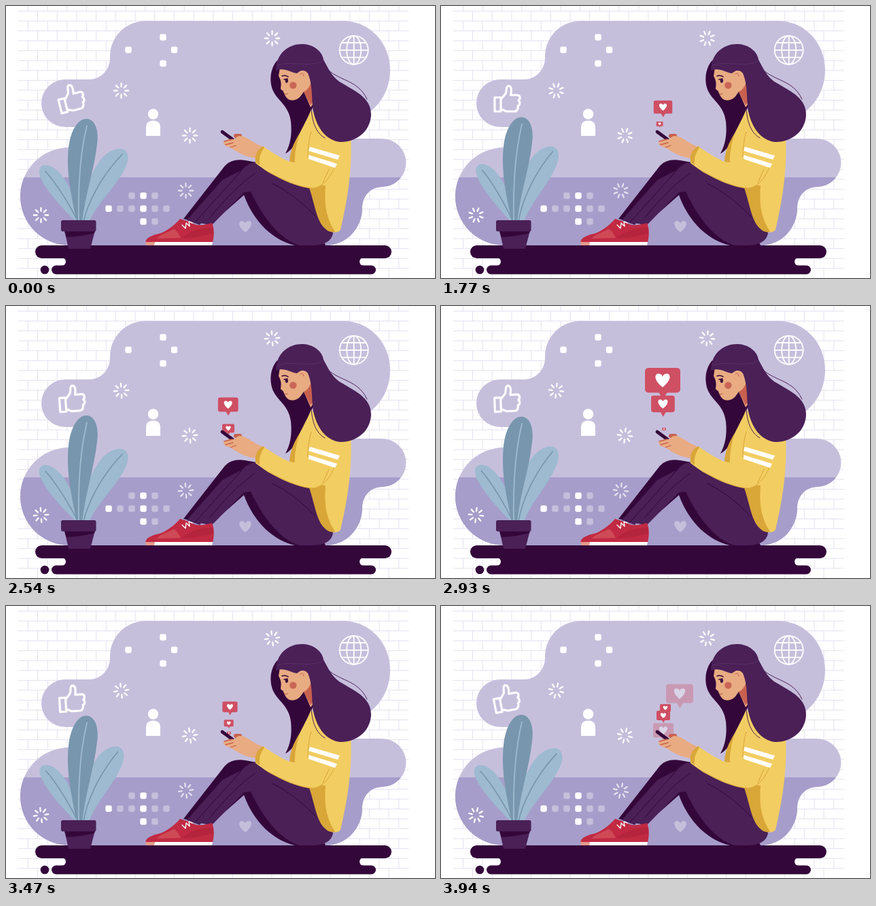
Recreate the animation shown at these times as an HTML page. Size 631x400 px, loop 4.03 s.

```html
<!DOCTYPE html>
<html lang="en">
<head>
<meta charset="utf-8">
<title>Likes</title>
<style>
  html, body { margin: 0; width: 100%; height: 100%; overflow: hidden; background: #fff; }
  svg { display: block; width: 631px; height: 400px; }
  .line { fill: none; stroke-linecap: round; stroke-linejoin: round; }
  .light { fill: #c6bfdc; }
  .plum { fill: #4a2057; }
  .dark { fill: #34073a; }
  .skin { fill: #e8ab82; }
  .sun { fill: #f2cd62; }
  .ochre { fill: #d9a638; }
  .white { fill: #fff; }
</style>
</head>
<body>
<svg viewBox="0 0 631 400">
  <defs>
    <path id="blob" d="M205 22H497A68 72 0 0 1 565 94C565 120 553 142 536 155C520 168 505 178 505 186Q505 195 514 195H553A35 35 0 0 1 553 266C536 266 524 280 524 297A54 55 0 0 1 470 352H93A72 72 0 0 1 93 208H104A15 15 0 0 0 104 178H87A35 35 0 0 1 87 108H122A31 31 0 0 0 153 77V74A52 52 0 0 1 205 22Z"/>
    <clipPath id="inside"><use href="#blob"/></clipPath>
    <path id="heart" d="M0 10C-14 -1 -12 -10 -6 -10C-2 -10 0 -7 0 -5C0 -7 2 -10 6 -10C12 -10 14 -1 0 10Z"/>
    <path id="ray" class="line" stroke="#fff" stroke-width="2.3" d="M0 -6V-10.7"/>
    <g id="rays"></g>
    <g id="bubble" fill="#cf4f63">
      <rect x="-26" y="-18.5" width="52" height="36.5" rx="5"/>
      <path d="M-6 17H7L.5 28Z"/>
      <use href="#heart" class="white"/>
    </g>
  </defs>

  <path id="bricks" class="line" stroke="#e4e0ef"/>
  <use href="#blob" class="light"/>
  <rect y="252" width="631" height="100" fill="#a69dca" clip-path="url(#inside)"/>
  <g id="dots"></g>
  <g id="bursts"></g>

  <g class="white">
    <circle cx="216.5" cy="159" r="7.7"/>
    <path d="M206 191V179Q206 168.5 216.5 168.5T227 179V191Z"/>
  </g>
  <use href="#heart" class="light" transform="translate(352 324.5) scale(.83)"/>

  <g class="line" stroke="#fff" stroke-width="1.8">
    <circle cx="511.7" cy="64.8" r="21"/>
    <ellipse cx="511.7" cy="64.8" rx="10.5" ry="21"/>
    <path d="M511.7 44V86M491 64.8H532M494 54H529M494 75.6H529"/>
  </g>

  <path id="thumb" class="line" stroke="#fff" stroke-width="3.2" d="M79 134.5H88V155H79ZM89 136L95 129C97 126 95 118 99 117.5C104 117.5 104 124 102.5 131H112C117 131 117 137 114 139C117 141 116 146 113 147C114 150 112 155 108 155H97C94 155 91 152 89 152"/>

  <g class="dark">
    <rect x="43" y="352" width="524" height="19" rx="9.5"/>
    <rect x="67" y="381.5" width="477" height="13" rx="6.5"/>
    <path d="M82 370H526A5 5 0 0 0 526 382H82A5 5 0 0 0 82 370Z"/>
    <circle cx="57" cy="388" r="6.3"/>
  </g>

  <g id="leafL">
    <path fill="#9dbad0" d="M103 317C75 290 45 255 49 240C52 232 62 233 70 238C92 252 104 290 112 317Z"/>
    <path class="line" stroke="#7896ae" stroke-width="1.7" d="M106 317C92 290 75 262 58 243"/>
  </g>
  <g id="leafR">
    <path fill="#9dbad0" d="M109 317C112 285 120 250 140 225C152 211 166 208 173 211C181 215 181 226 176 237C163 265 138 285 122 317Z"/>
    <path class="line" stroke="#7896ae" stroke-width="1.7" d="M114 317C120 290 140 250 171 218"/>
  </g>
  <g id="leafC">
    <path fill="#7896ae" d="M104 317C96 280 88 245 92 208C95 183 106 165 119 166C131 167 137 182 134 203C130 240 118 270 112 317Z"/>
    <path class="line" stroke="#a0bbd0" stroke-width="1.8" d="M107 317C106 270 108 220 119 176"/>
  </g>
  <path class="plum" d="M86 330H131L124 357H92Z"/>
  <path class="dark" d="M86 331H131L130 334Q111 339 88.5 340Z"/>
  <rect class="plum" x="81" y="315" width="51.5" height="16.5" rx="2.5"/>

  <g id="likes"></g>

  <!-- legs -->
  <path class="dark" d="M261 313L322 235Q332 224 352 227L380 232L440 290L470 352H425C395 345 365 320 350 278L300 322Z"/>
  <path class="plum" d="M266 315L318 256L345 242L285 322Z"/>
  <path class="plum" d="M278 318L345 244Q356 228 376 229L448 268C458 300 480 322 481 334C479 346 468 352 450 352H432C405 345 378 312 360 273L350 274L303 322Z"/>
  <path class="line" stroke="#34073a" d="M278 318L342 247M366 246C350 258 332 272 300 311M392 261Q425 277 455 309"/>

  <!-- shoe -->
  <path fill="#c12a42" d="M205 348C206 340 215 337 228 334C240 329 250 320 256 313L272 318C280 325 292 322 303 319C307 328 306 338 304 348Z"/>
  <path fill="#cf4a57" d="M222 342C227 335 240 333 246 328C252 330 254 336 257 341Z"/>
  <path fill="#a81f38" d="M258 341C270 333 280 326 304 326L305 335C290 337 280 342 258 341Z" opacity=".5"/>
  <path fill="#e39a8c" d="M205 347H220L219 352H206Z"/>
  <path class="white" d="M219 347H304L303 352H218Z"/>
  <path class="line" stroke="#fff" stroke-width="1.4" d="M259 322L264 327L265 319L270 324L269 317L274 319"/>

  <!-- back hair -->
  <path class="dark" d="M399 80C388 92 387 112 393 125C400 140 416 146 419 170C421 190 418 204 411 217C424 211 434 190 444 165L453 145L435 95Z"/>

  <!-- torso -->
  <path class="sun" d="M449 152C440 175 422 200 418 226L448 262C455 290 462 318 472 329C480 334 489 334 492 329C500 295 510 245 507 190L455 160Z"/>
  <path class="ochre" d="M432 187C424 200 418 212 417 228L425 234C424 215 428 200 432 187ZM444 262L470 264C468 290 470 310 484 332Q475 334 469 327C456 316 454 288 444 262Z"/>

  <!-- hand and phone -->
  <path class="line" stroke="#c8604f" stroke-width="6" d="M338 191H344"/>
  <path class="line" stroke="#34073a" stroke-width="4.8" d="M318 185L333 196"/>
  <path class="skin" d="M376 206C362 201 354 191 344 191C338 191 339 196 334 196C328 195 323 197 320 200C320 205 324 207 330 208C340 215 352 222 368 224Z"/>
  <path class="line" stroke="#c8604f" stroke-width="1.3" d="M321 199L333 196M323 204L334 201M330 208L338 205"/>

  <!-- sleeve -->
  <path class="sun" d="M378 206C392 216 414 230 424 230C438 220 440 200 449 180L493 205C490 232 476 264 453 268C430 269 389 249 367 231Q366 216 378 206Z"/>
  <path class="ochre" d="M378 206Q365 214 367 229L373 234Q371 220 380 208Z"/>
  <path class="line" stroke="#d9a638" d="M449 185C445 199 444 211 444 222M384 243Q430 268 453 268C469 265 480 247 485 232M475 240L466 260"/>
  <path class="white" d="M447 207L491 220L488 226L445 213ZM445 219L487 232L484 238L445 225Z"/>

  <!-- head -->
  <path class="skin" d="M403 90L401 103C405 110 405 115 404 121C404 124 408 124 408 126C410 130 411 134 415 137C420 140 428 139 433 133L438 126C442 135 445 142 448 149L455 140L446 95Z"/>
  <path fill="#c8604f" d="M438 126C445 123 447 117 449 112L453 138L448 146Z"/>
  <circle cx="422.3" cy="116.6" r="5.2" fill="#cb6656"/>
  <ellipse class="dark" cx="412.8" cy="110" rx="2.1" ry="3"/>
  <path class="line" stroke="#34073a" stroke-width="1.5" d="M406 103Q411 101 415 104M409 108L414 107"/>
  <path class="line" stroke="#b65748" stroke-width="1.2" d="M410 130L414 129"/>
  <path class="plum" d="M397 95C397 68 418 55 437 56C455 57 466 69 467 79C474 92 479 103 490 111C515 126 537 135 537 160C536 185 515 200 492 200C470 198 457 178 452 155C449 140 452 118 444 99C438 92 432 96 428 99C418 98 410 90 397 95Z"/>
  <path class="line" stroke="#4a2057" d="M466 84C482 112 516 104 531 137M449 152C451 175 458 188 469 194"/>
  <path class="line" stroke="#5b2f69" d="M400 87C420 80 448 91 466 81"/>
  <ellipse class="skin" cx="435.5" cy="102" rx="5.5" ry="7"/>
  <path class="line" stroke="#c8604f" d="M433 100Q437 97 438 103"/>
</svg>
<script>
const $ = id => document.getElementById(id);
const add = (parent, tag, attrs) => {
  const el = document.createElementNS('http://www.w3.org/2000/svg', tag);
  for (const k in attrs) el.setAttribute(k, attrs[k]);
  return parent.appendChild(el);
};

// wall
let wall = '';
for (let i = 0; i < 29; i++) {
  const y = 7.5 + (i - 1) * 14.55;
  wall += `M18 ${y}H592`;
  for (let x = i % 2 ? 46.5 : 32.5; x < 590; x += 28.7) wall += `M${x} ${y}v14.55`;
}
$('bricks').setAttribute('d', wall);

// squares
const dot = (x, y, fill = '#fff') =>
  add($('dots'), 'rect', { x: x - 4.7, y: y - 4.7, width: 9.4, height: 9.4, rx: 2.4, fill });
dot(231, 46);
dot(180, 64.5);
dot(247.5, 64.5);
dot(231, 84.5);
['  .#.', '#..#..', '   #.'].forEach((row, r) => [...row].forEach((c, i) => {
  if (c !== ' ') dot(151 + i * 17, 279 + r * 19, c === '#' ? '#fff' : '#c6bfdc');
}));

for (let a = 0; a < 360; a += 45) add($('rays'), 'use', { href: '#ray', transform: `rotate(${a})` });
const bursts = [[391.5, 47.5], [169.5, 124.5], [270.5, 190.5], [264.5, 271.5, .7], [51.5, 307.5]]
  .map(([x, y, opacity = 1]) => ({ x, y, el: add($('bursts'), 'use', { href: '#rays', opacity }) }));

// each bubble leaves the phone: birth, end of fade, then stops of step, x, y, width
const likes = [];
const like = (birth, end, ...stops) => likes.push({
  birth, end,
  keys: [[birth, 327.5, 188, 3], ...stops],
  el: add($('likes'), 'use', { href: '#bubble' })
});
like(1, 14, [11, 325.5, 109.5, 52]);
like(4, 12.8, [11, 307, 137, 27]);
like(10, 24, [21, 326, 109.5, 52]);
like(14, 28, [16, 327, 180, 18], [25, 326, 115.5, 48]);
like(20, 35, [25, 330, 153, 15], [30, 329, 145.5, 27], [34, 351, 129, 40]);
like(22, 40, [25, 328, 178, 11], [34, 327, 161, 20]);
like(24, 40, [30, 328, 186, 7], [34, 330, 150, 16]);
like(32, 35, [34, 327, 183, 30]);

const sway = {
  left: [[1, 0], [10, 3.5], [16, 0], [25, 1.6], [30, 0]],
  right: [[1, 0], [10, -6.7], [16, 0], [25, -6.7], [31, -.6]],
  grow: [[0, 1], [1, 1.012], [11, 1.02], [16, 1.033], [25, 1.013], [30, 1.04]],
  thumb: [[0, -14], [1, -11], [6, 0], [11, -10], [16, -4], [19, 0], [25, -10], [30, 0], [34, -11]]
};

const smooth = u => u * u * (3 - 2 * u);
const clamp = u => Math.max(0, Math.min(1, u));
function sample(keys, k, ease = u => u) {
  let i = 1;
  while (i < keys.length - 1 && keys[i][0] < k) i++;
  const a = keys[i - 1], b = keys[i];
  const u = ease(clamp((k - a[0]) / (b[0] - a[0])));
  return a.map((v, j) => v + (b[j] - v) * u).slice(1);
}

const LOOP = 4030, HOLD = 1390, STEP = 77.27;
const put = (el, value) => el.setAttribute('transform', value);

function draw(t) {
  const k = t < HOLD ? 0 : Math.min(34, 1 + Math.floor((t - HOLD) / STEP + .15));
  const at = name => sample(sway[name], k, smooth)[0];
  put($('leafL'), `rotate(${at('left')} 103 317)`);
  put($('leafR'), `rotate(${at('right')} 112 317)`);
  put($('leafC'), `translate(0 317) scale(1 ${at('grow')}) translate(0 -317)`);
  put($('thumb'), `rotate(${at('thumb')} 92 144)`);
  for (const b of bursts) put(b.el, `translate(${b.x} ${b.y}) rotate(${k * 11})`);
  for (const { birth, end, keys, el } of likes) {
    const [x, y, w] = sample(keys, k);
    put(el, `translate(${x} ${y}) scale(${w / 52})`);
    el.setAttribute('opacity', k < birth ? 0 : clamp((end - k) / 3));
  }
}

const start = performance.now();
(function tick() {
  draw((performance.now() - start) % LOOP);
  requestAnimationFrame(tick);
})();
</script>
</body>
</html>
```
